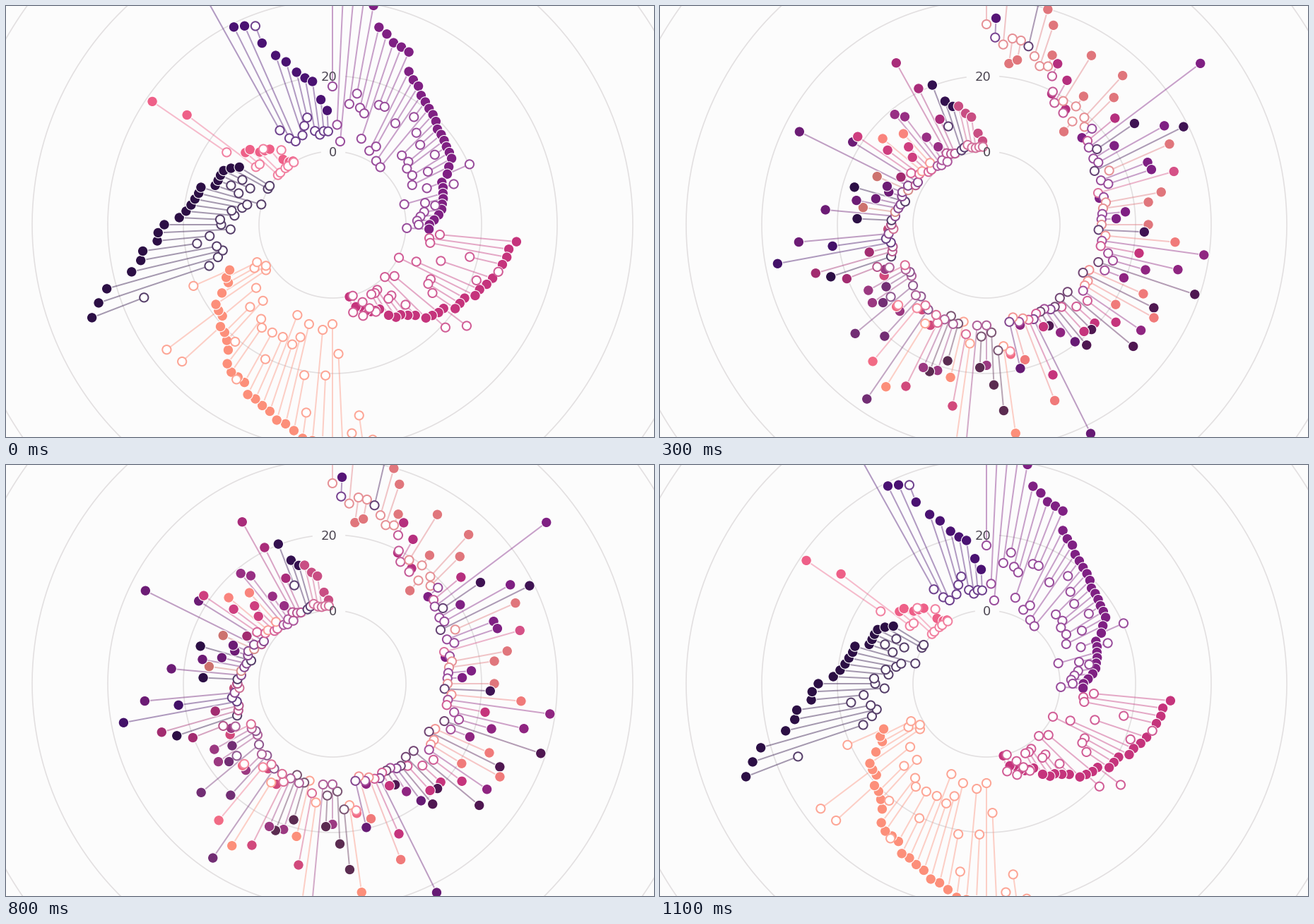
A matplotlib script that plays this animation: 917x611 px, repeating every 1.2 s.

```python
import numpy as np
import matplotlib.pyplot as plt
from matplotlib.animation import FuncAnimation
from matplotlib.collections import LineCollection
from matplotlib.colors import to_rgb

W, H, DPI = 917, 611, 100
CX, CY = 462, 310
PX = 72 / DPI
BG = "#fcfcfc"
COLORS = dict(P="#7f2083", M="#c5347c", S="#fc8f7a",
              D="#2c0f45", K="#ee6088", I="#4a1272")

# Groups and outer radii, ten dumbbells per row, ordered by inner value
ROWS = [
    ("SISSSDSSSM", [340, 276, 325, 202, 214.5, 365, 328, 305.8, 254, 244]),
    ("MMSMSSSSPM", [197, 234, 297, 191, 231, 159, 308, 269, 177.6, 247]),
    ("PDPPDSPPKP", [432.6, 271, 218, 316, 349, 314, 267.6, 270, 309, 165]),
    ("SSPPSDSPMP", [279, 253.4, 211, 195.5, 256, 249, 270, 328, 210.5, 287.5]),
    ("PDPSDSSPMD", [231, 332, 201, 247, 276, 288, 215.9, 281, 239, 292]),
    ("MDMDIPDMIM", [212, 217, 214, 238, 222, 193, 173.6, 174, 388, 261.5]),
    ("SPSIKSDDPD", [307.5, 158, 222, 240, 142, 290, 247, 202, 166, 172]),
    ("PSMSDPDPMM", [351, 313, 251, 202.5, 175, 200, 208, 207, 252, 136]),
    ("SIMKIPKIIP", [275, 313, 123, 258, 211.6, 161, 160, 253, 178, 194.5]),
    ("IPMPMDMMII", [162, 198, 160, 156, 167, 198, 227.6, 134.6, 308, 205]),
    ("PKMDPSPPDP", [272, 108, 105, 173.2, 235, 168.7, 184, 151, 194.5, 137.2]),
    ("PSPMPMMSMM", [144, 168, 332, 131, 242.5, 195, 151, 200, 137, 159]),
    ("SPPPPMMMDD", [184, 222, 214, 162.5, 136.8, 225.6, 187, 121, 193.5, 164.4]),
    ("DKKKKK", [155, 158, 145.5, 139, 116, 106]),
]
GROUP = np.array(list("".join(r[0] for r in ROWS)))
OUTER = np.concatenate([r[1] for r in ROWS])
N = len(GROUP)

KNOTS = [(0, 310), (1, 302), (2, 297), (3, 294), (4, 288), (5, 286), (6, 273),
         (7, 269), (8, 258), (9, 244), (10, 238), (11, 218.5), (12, 217),
         (15, 215), (18, 212), (19, 199.5), (20, 196), (21, 193.5), (23, 189),
         (24, 184), (27, 182), (29, 181), (31, 177), (33, 175.5), (36, 174),
         (40, 169), (43, 167.5), (47, 164), (49, 159.5), (52, 159), (55, 154.5),
         (59, 152.6), (60, 149.7), (62, 146), (67, 144), (71, 141), (74, 140),
         (79, 138), (86, 134), (91, 132), (95, 130), (100, 128.5), (106, 126),
         (108, 124), (110, 120), (114, 117), (115, 114), (117, 114),
         (119, 112), (121, 109.5), (122, 106), (125, 105), (135, 104)]
INNER = np.interp(np.arange(N), *zip(*KNOTS))
RGB = np.array([to_rgb(COLORS[g]) for g in GROUP])

# Grouped order: by group, largest outer value first
order = sorted(range(N), key=lambda i: ("PMSDKI".index(GROUP[i]), -OUTER[i]))

theta = np.arange(N) * 2 * np.pi / N
RAY = np.column_stack([np.sin(theta), -np.cos(theta)])

# Ease in and out, hold, then back
RISE = [0, 0.163, 0.435, 0.773, 0.931, 1]
PROGRESS = RISE + RISE[::-1]


def blend(start, end, p):
    return start + (end - start) * p


def place(radius):
    return [CX, CY] + RAY * radius[:, None]


fig = plt.figure(figsize=(W / DPI, H / DPI), dpi=DPI, facecolor=BG)
ax = fig.add_axes([0, 0, 1, 1])
ax.set_xlim(0, W)
ax.set_ylim(H, 0)
ax.axis("off")

# Rings leave a gap for their label
for value in range(0, 100, 20):
    r = 104 + 5.35 * value
    left = 17 if value == 0 else 29
    a = np.linspace(np.arcsin(19 / r), 2 * np.pi - np.arcsin(left / r), 400)
    ax.plot(CX + r * np.sin(a), CY - r * np.cos(a), color="#e2dfe0",
            lw=1.6 * PX, zorder=1)
    ax.text(CX + 6, CY - r, str(value), ha="right", va="center_baseline",
            family="DejaVu Sans", size=18 * PX, color="#4d4753", zorder=5,
            clip_on=True)

stems = LineCollection([], linewidths=2 * PX, alpha=0.42, zorder=2)
ax.add_collection(stems)
dots = ax.scatter(*place(OUTER).T, s=(14.5 * PX) ** 2, linewidths=1.1 * PX,
                  edgecolors="white", zorder=3)
rings = ax.scatter(*place(INNER).T, s=(12.2 * PX) ** 2, linewidths=2 * PX,
                   facecolors="white", zorder=4)


def draw(frame):
    p = PROGRESS[frame]
    outer = place(blend(OUTER[order], OUTER, p))
    inner = place(blend(INNER[order], INNER, p))
    rgb = blend(RGB[order], RGB, p)
    stems.set_segments(np.stack([inner, outer], axis=1))
    stems.set_color(rgb)
    dots.set_offsets(outer)
    dots.set_facecolor(rgb)
    rings.set_offsets(inner)
    rings.set_edgecolor(blend(1, rgb, 0.8))
    return stems, dots, rings


anim = FuncAnimation(fig, draw, frames=len(PROGRESS), interval=100,
                     repeat=True, repeat_delay=0)
plt.show()
```
